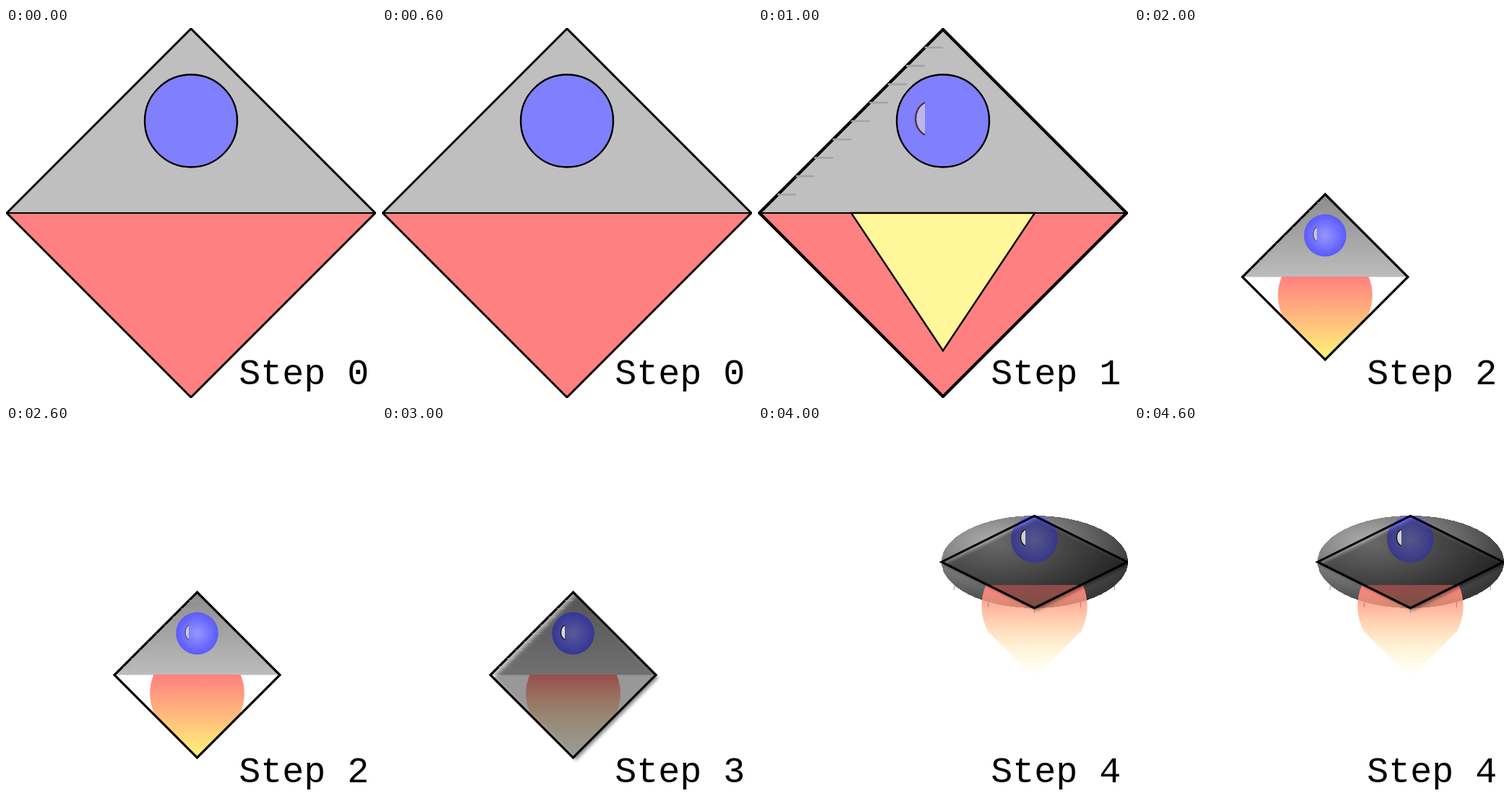
Recreate the animation shown at these times as an HTML page. Size 512 by 512 pixels, loop 5 s.

```html
<!DOCTYPE html>
<html lang="en">
<head>
<meta charset="utf-8">
<title>Drawing steps</title>
<style>
  html, body { margin: 0; width: 100%; height: 100%; overflow: hidden; background: #fff; }
  svg { display: block; width: 100%; height: 100%; }
  text { font: 50px "Liberation Mono", "Courier New", monospace; }
  .ink { stroke: #000; fill: none; }
</style>
</head>
<body>
<svg viewBox="0 0 512 512">
  <defs>
    <linearGradient id="hull" x2="0" y2="1">
      <stop stop-color="#8c8c8c"/><stop offset="1" stop-color="#bcbcbc"/>
    </linearGradient>
    <radialGradient id="dome">
      <stop stop-color="#9696ff"/><stop offset="1" stop-color="#5a5aff"/>
    </radialGradient>
    <linearGradient id="flame" x2="0" y2="1">
      <stop stop-color="#ff8080"/><stop offset="1" stop-color="#fff57a"/>
    </linearGradient>
    <linearGradient id="beam" x2="0" y2="1">
      <stop stop-color="#ff8080"/><stop offset="1" stop-color="#ffff80" stop-opacity="0"/>
    </linearGradient>
    <radialGradient id="saucer" cx=".3" cy=".3" r=".75">
      <stop stop-color="#b4b4b4"/><stop offset=".5" stop-color="#787878"/><stop offset="1" stop-color="#383838"/>
    </radialGradient>
    <filter id="soft" x="-20%" y="-20%" width="140%" height="140%">
      <feGaussianBlur stdDeviation="2.2"/>
    </filter>
    <filter id="softer" x="-20%" y="-20%" width="140%" height="140%">
      <feGaussianBlur stdDeviation="5"/>
    </filter>
    <clipPath id="roof"><path d="M264.5 230L379 344.5H150Z"/></clipPath>
  </defs>
  <g id="scene"></g>
  <text id="label" x="322.2" y="493"></text>
</svg>
<script>
const STEP = 1000;

const diamond = (cx, cy, rx, ry, attrs) =>
  `<path d="M${cx} ${cy - ry}L${cx + rx} ${cy}L${cx} ${cy + ry}L${cx - rx} ${cy}Z" ${attrs}/>`;

const circle = (cx, cy, r, attrs) => `<circle cx="${cx}" cy="${cy}" r="${r}" ${attrs}/>`;

const outline = width => `class="ink" stroke-width="${width}"`;

const crescent = (x, y, w, h, fill, stroke, width) =>
  `<path d="M${x} ${y - h}C${x - w * 1.33} ${y - h * .6} ${x - w * 1.33} ${y + h * .6} ${x} ${y + h}"
    fill="${fill}" stroke="${stroke}" stroke-width="${width}"/>`;

// Short strokes that start on the upper left edge
const rivets = (x, y, gap, length, attrs) => {
  let d = "";
  for (let i = 1; i < 10; i++) d += `M${x - gap * i} ${y + gap * i}h${length}`;
  return `<path d="${d}" fill="none" ${attrs}/>`;
};

// Round shoulders that run into a point
const flame = (cx, top, k, fill) =>
  `<path transform="translate(${cx} ${top}) scale(${k})" fill="url(#${fill})"
    d="M-60 0A66.5 66.5 0 0 0 -57.5 57.5L0 114.5L57.5 57.5A66.5 66.5 0 0 0 60 0Z"/>`;

const flat = (radius, edge) =>
  diamond(256, 256, radius, radius, 'fill="#ff8080"') +
  `<path d="M256 ${256 - radius}L${256 + radius} 256H${256 - radius}Z" fill="#bfbfbf"/>` +
  diamond(256, 256, radius, radius, outline(edge)) +
  `<path d="M${256 - radius} 256H${256 + radius}" ${outline(2)}/>`;

const ball = circle(256, 128.5, 64, 'fill="#8080ff" stroke="#000" stroke-width="2.4"');

const roof = '<path d="M264.5 230L379 344.5H150Z" fill="url(#hull)"/>';
const smallBall = circle(264.5, 287, 29.3, 'fill="url(#dome)"');
const smallEdge = diamond(264.5, 344.5, 114.5, 114.5, outline(3.2));
const smallRivets = color =>
  rivets(264.5, 230, 11.45, 11, `stroke="${color}" stroke-width=".8"`);

const scenes = [
  () => flat(255, 3) + ball,

  () => flat(254, 4.2) + ball +
    '<path d="M129 256H383L256 446.5Z" fill="#fff799" stroke="#000" stroke-width="2.4"/>' +
    rivets(256, 1.5, 25.45, 26, 'stroke="#a4a4a4" stroke-width="2.6"') +
    crescent(231, 125.5, 13, 22.5, "#bcb8e6", "#583050", 2.4),

  () => roof + flame(264.5, 344, 1, "flame") + smallBall +
    crescent(253, 285.5, 5, 10, "#c8c8dc", "#333", 1) + smallEdge + smallRivets("#a0a0a0"),

  () => roof + flame(264.5, 344, 1, "beam") + smallBall +
    diamond(268.5, 348.5, 114.5, 114.5, 'opacity=".4" filter="url(#soft)"') +
    `<g clip-path="url(#roof)"><path d="M144 344L264 224" stroke="#fff" stroke-width="20"
      opacity=".28" filter="url(#softer)"/></g>` +
    crescent(253, 285.5, 5.5, 10, "#d8d8d8", "#111", 1.4) + smallEdge + smallRivets("#b4b4b4"),

  () => `<ellipse cx="383" cy="188" rx="129" ry="64" fill="url(#saucer)" shape-rendering="crispEdges"/>` +
    circle(382.5, 156.5, 32.5, 'fill="url(#dome)" opacity=".85"') +
    flame(382.5, 220, 1.118, "beam") +
    diamond(386, 191.5, 128.5, 64, 'opacity=".42" filter="url(#soft)"') +
    crescent(370, 154.5, 6.5, 11.5, "#d0d0d0", "#111", 1.4) +
    '<path d="M271.5 221v6M318.5 244v7M382.5 252v7M446.5 244v7M493.5 221v6" stroke="#777" stroke-width=".7"/>' +
    diamond(382.5, 188.2, 128.5, 63.8, outline(3.1)),
];

const scene = document.getElementById("scene");
const label = document.getElementById("label");
const start = performance.now();
let shown = -1;

function draw(time) {
  const step = Math.floor(Math.max(0, time) / STEP) % scenes.length;
  if (step === shown) return;
  shown = step;
  scene.innerHTML = scenes[step]();
  label.textContent = `Step ${step}`;
}

function tick() {
  draw(performance.now() - start);
  requestAnimationFrame(tick);
}
tick();
</script>
</body>
</html>
```
